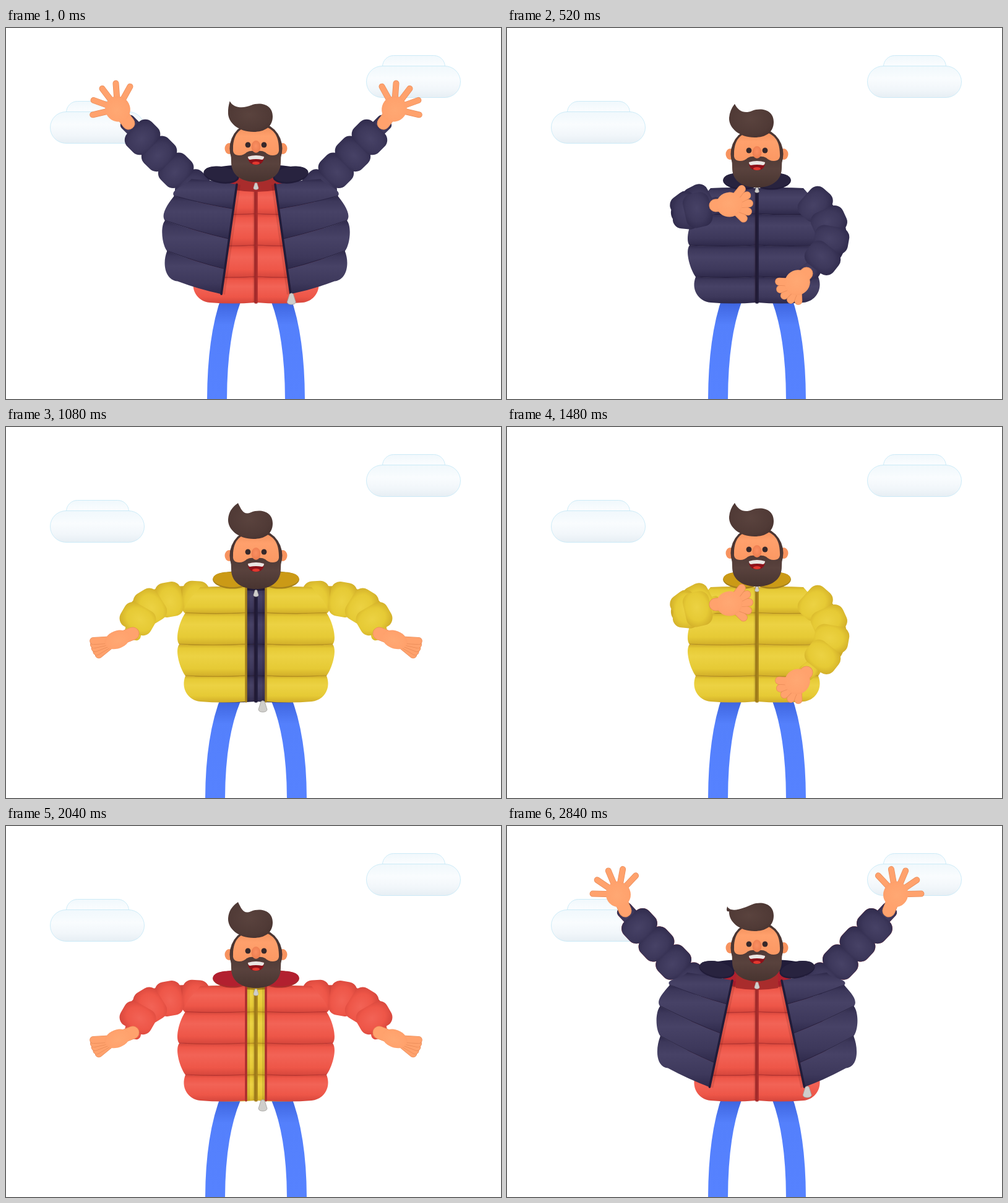
Recreate the animation shown at these times as an HTML page. Size 800 by 600 pixels, loop 2.88 s.

```html
<!DOCTYPE html>
<html lang="en">
<head>
<meta charset="utf-8">
<title>Jackets</title>
<style>
html, body { margin: 0; width: 100%; height: 100%; overflow: hidden; background: #fff; }
svg { display: block; width: 100vw; height: 100vh; }
</style>
</head>
<body>
<svg viewBox="0 0 800 600">
  <defs id="defs"></defs>
  <g id="clouds"></g>
  <g id="scene"></g>
</svg>
<script>
const LOOP = 960, STEP = 40, SWAP = 540, OPEN = 740, AXIS = 808;
const $ = id => document.getElementById(id);
const { sin, cos, max, min, PI, hypot, atan2 } = Math;
const RAD = PI / 180;
const mix = (a, b, k) => a + (b - a) * k;
const clamp = x => max(0, min(1, x));

const tones = [
  { id: 'navy', light: '#474266', mid: '#3d385b', dark: '#2e294a', seam: '#211c39', collar: '#28233f' },
  { id: 'yellow', light: '#ecd243', mid: '#e6ca35', dark: '#d0ac28', seam: '#a5801b', collar: '#cb9a16' },
  { id: 'red', light: '#f26356', mid: '#ee5648', dark: '#d4453b', seam: '#a92c2c', collar: '#b2202f' }
];

// Body: time, jacket gap, jacket tilt, eye line, lean of the quiff.
const bodyKeys = [
  [0, 30, 8, 189, 0.3], [120, 15, 0, 202, 1], [250, 14, -4.3, 197, 0.5], [480, 0, 0, 198, 0.63],
  [SWAP, 0, 0, 198, 0.63], [OPEN, 39, 12, 190, 0.8], [920, 39, 12, 191, 0]
];

// Arm: elbow, wrist, aim of the fingers, angle between them. Drawn for the left, mirrored for the right.
const lifted = [253, 209, 198, 154, -25, -33, 33];
const raised = [247, 197, 191, 137, -16, -38, 33];
const skyward = [272, 165, 264, 82, 0, -41, 30];
const sideways = [215, 268, 205, 334, -36, 14, 9];
const zipLow = [225, 390, 346, 428, 29, 8, -24];
const zipHigh = [251, 311, 337, 287, 32, -2, -24];
const holdHem = [245, 335, 324, 397, 21, 21, -24];
const armKeys = (from, to) => [[0, ...lifted], [120, ...sideways], [250, ...from], [480, ...to],
  [550, ...to], [OPEN, ...skyward], [820, ...skyward], [920, ...raised]];
const arms = [armKeys(zipLow, zipHigh), armKeys(holdHem, holdHem)];

// Cyclic monotone cubic interpolation.
function at(keys, t) {
  const n = keys.length;
  const key = i => keys[(i + n) % n];
  const time = i => key(i)[0] + LOOP * Math.floor(i / n);
  let i = n - 1;
  while (key(i)[0] > t) i--;
  const h = time(i + 1) - time(i), u = (t - time(i)) / h;
  return key(i).slice(1).map((a, j) => {
    const slope = m => (key(m + 1)[j + 1] - key(m)[j + 1]) / (time(m + 1) - time(m));
    const tangent = m => {
      const p = slope(m - 1), q = slope(m);
      return p * q > 0 ? 2 * p * q / (p + q) : 0;
    };
    const b = key(i + 1)[j + 1], v = u * u, w = v * u;
    return a + (b - a) * (3 * v - 2 * w) + h * (tangent(i) * (w - 2 * v + u) + tangent(i + 1) * (w - v));
  });
}

function bodyAt(t) {
  const [gap, tilt, eye, lean] = at(bodyKeys, t);
  return { gap, tilt, eye, lean };
}

function armAt(keys, t) {
  const [ex, ey, wx, wy, ax, ay, fan] = at(keys, t);
  const tilt = max(0, bodyAt(t).tilt);
  return { sx: 318 - 1.2 * tilt, sy: 278 - 1.8 * tilt, ex, ey, wx, wy, ax, ay, fan };
}

const path = (d, attrs) => `<path d="${d}" ${attrs}/>`;
const oval = (x, y, rx, ry, attrs) => `<ellipse cx="${x}" cy="${y}" rx="${rx}" ry="${ry}" ${attrs}/>`;
const group = (transform, s) => `<g transform="${transform}">${s}</g>`;
const flip = s => group(`matrix(-1 0 0 1 ${AXIS} 0)`, s);
const both = s => s + flip(s);

// Front edge of a jacket half, from neck to hem.
function frontEdge({ gap, tilt }) {
  const x = 403 - gap, y = 259 - 0.75 * max(0, tilt), len = 185 - 0.75 * max(0, tilt);
  return [x, y, x - len * sin(tilt * RAD), y + len * cos(tilt * RAD)];
}

function panel(body, tone) {
  const [x0, y0, x1, y1] = frontEdge(body);
  const inner = i => {
    const k = i / 4 + 0.025 * sin(PI * (i - 2) / 2);
    return [mix(x0, x1, k), mix(y0, y1, k)];
  };
  const outer = i => {
    const [x, y] = inner(i), w = 74 + 34 * sin(PI * i / 4);
    const a = 2.2 * max(0, body.tilt) * sin(PI * (i + 1) / 8) * RAD;
    return [x - w * cos(a), y - w * sin(a)];
  };
  const edge = `M${x0} ${y0}L${x1} ${y1}`;
  let s = path(edge, 'stroke="#200" stroke-opacity=".1" stroke-width="12"');
  for (let i = 0; i < 4; i++) {
    const a = inner(i), b = inner(i + 1), o = outer(i), p = outer(i + 1), hem = i === 3;
    const crease = (q, r, sag) => `Q${(q[0] + r[0]) / 2} ${(q[1] + r[1]) / 2 + sag} ${r}`;
    const side = hem
      ? `C${p[0] - 20} ${p[1] - 2} ${o[0] - 8} ${o[1] + 20} ${o}`
      : `C${p[0] - 8} ${p[1] - 10} ${o[0] - 8} ${o[1] + 10} ${o}`;
    s += path(`M${a}L${b}${crease(b, p, 3)}${side}${crease(o, a, i ? 3 : -2)}Z`, `fill="url(#row-${tone.id})"`);
    if (!hem) s += path(`M${b}${crease(b, p, 3)}`, `fill="none" stroke="${tone.seam}" stroke-width="2" stroke-opacity=".7"`);
  }
  return s + path(edge, `stroke="${tone.seam}" stroke-width="3.5" stroke-linecap="round"`);
}

function sleeve({ sx, sy, ex, ey, wx, wy }, tone) {
  const puff = (t, len, wide, r) => {
    const u = 1 - t;
    const x = u * u * sx + 2 * u * t * ex + t * t * wx, y = u * u * sy + 2 * u * t * ey + t * t * wy;
    const turn = atan2(mix(ey - sy, wy - ey, t), mix(ex - sx, wx - ex, t)) / RAD;
    return group(`translate(${x} ${y}) rotate(${turn})`,
      `<rect x="${-len / 2}" y="${-wide / 2}" width="${len}" height="${wide}" rx="${r}" fill="url(#puff-${tone.id})"/>`);
  };
  let s = puff(0.97, 28, 27, 7) +
    path(`M${sx} ${sy}Q${ex} ${ey} ${mix(ex, wx, 0.75)} ${mix(ey, wy, 0.75)}`,
      `fill="none" stroke="${tone.dark}" stroke-width="38"`);
  for (let i = 0; i < 4; i++) s += puff(0.06 + 0.245 * i, 43, 56, 15);
  return s;
}

function hand({ wx, wy, ax, ay, fan }) {
  const px = 0.7 * ax, py = 0.7 * ay, aim = atan2(ay, ax), reach = max(28, hypot(ax, ay));
  const limb = (x, y, w) => ['#e88a57', '#ffa26d'].map((c, i) =>
    path(`M${px} ${py}L${x} ${y}`, `stroke="${c}" stroke-width="${w - 1.4 * i}" stroke-linecap="round"`)).join('');
  let s = limb(0, 0, 21);
  for (let i = 4; i >= 0; i--) {
    const a = aim + fan * (2 - i) * RAD;
    s += limb(px + reach * cos(a), py + reach * sin(a), 13 - 3 * clamp(fan / 33));
  }
  s += group(`translate(${px} ${py}) rotate(${aim / RAD})`,
    oval(0, 0, 21, 11 + 9 * clamp(Math.abs(fan) / 24), 'fill="url(#skin)"'));
  return group(`translate(${wx} ${wy})`, s);
}

function collar({ gap, tilt }) {
  const x = 349 - gap, lean = max(0, tilt), y = 248 - 1.3 * lean;
  return {
    back: tone => oval(404, y - 5, 398 - x, 12, `fill="${tone.seam}"`),
    flaps: tone => both(group(`translate(${x + 29} ${y}) rotate(${4 + lean * 0.6})`,
      oval(0, 0, 29, 13.5, `fill="${tone.seam}"`) + oval(-1, -1, 27.5, 12, `fill="${tone.collar}"`)))
  };
}

const tab = (x, y, size) => group(`translate(${x} ${y}) scale(${size})`,
  path('M-3-8Q0-11 3-8L7 5Q6 9 0 9Q-6 9-7 5Z', 'fill="#cfcecb" stroke="#9f9d9b" stroke-width=".8"'));

function head({ eye, lean }) {
  const tx = -48 + 19 * lean, ty = -61 - 18 * Math.sqrt(lean);
  const eyes = [-13, 13].map(x => oval(x, 0, 4.4, 4.6, 'fill="#37282a"')).join('');
  const ears = [-43.5, 43.5].map(x => oval(x, 6, 7, 9, 'fill="#f7935f"')).join('');
  return group(`translate(404 ${eye})`,
    ears +
    oval(0, 6, 42.5, 43, 'fill="#4b3633"') +
    path('M-41 0L-40 28C-40 50-22 60 0 60C22 60 40 50 40 28L41 0Z', 'fill="url(#beard)"') +
    path('M-37 6C-37-20-24-31 0-31C24-31 37-20 37 6Q38 17 27 17Q20 17 15 12Q8 8 0 11Q-8 8-15 12Q-20 17-27 17Q-38 17-37 6Z',
      'fill="url(#face)"') +
    path('M-13 19Q0 15 13 19Q13 32 0 32Q-13 32-13 19Z', 'fill="#8d1119"') +
    oval(0, 29.5, 6, 2.5, 'fill="#e2382f"') +
    path('M-13 19Q0 15 13 19Q13 23 10 24Q0 22-10 24Q-13 23-13 19Z', 'fill="#e9e6e3"') +
    eyes +
    oval(0, 3, 7.5, 10, 'fill="url(#nose)"') +
    path(`M${tx} ${ty}C${tx + 6} ${ty + 12} -20 -59 -8 -64C8 -70 27 -65 27 -46C27 -29 14 -21 -4 -21` +
      `C-28 -21 -46 -36 -45 -53Q${min(-44, tx - 3)} ${ty + 10} ${tx} ${ty}Z`, 'fill="url(#quiff)"'));
}

function legs(eye) {
  const foot = 341 - 0.75 * max(0, eye - 198);
  return both(path(`M364 438Q${foot} 500 ${foot} 604`, 'fill="none" stroke="url(#denim)" stroke-width="32"'));
}

function figure(time) {
  const turn = Math.floor(time / LOOP), t = time % LOOP;
  const falling = t > SWAP, late = falling ? max(t, OPEN) : t;
  const outer = tones[(turn + falling) % 3], inner = tones[(turn + falling + 2) % 3];
  const drop = falling ? -430 * (1 - clamp((t - 530) / 350) ** 2) : 0;
  const landed = drop > -20;
  const moved = s => group(`translate(0 ${drop})`, s);

  const body = bodyAt(t), coat = bodyAt(late), shut = bodyAt(SWAP);
  const neck = collar(coat), innerNeck = collar(shut);
  const limbs = arms.map(k => armAt(k, t)), worn = arms.map(k => armAt(k, late));
  const hands = hand(limbs[0]) + flip(hand(limbs[1]));
  const outward = a => a.wx < 285;
  const sleeves = (list, tone, wanted) => {
    const [l, r] = list.map(a => wanted(a) ? sleeve(a, tone) : '');
    return l + flip(r);
  };
  const jacket = (b, list, tone) => sleeves(list, tone, outward) + both(panel(b, tone)) +
    sleeves(list, tone, a => !outward(a));

  const [x0, y0, x1, y1] = frontEdge(coat);
  const zip = clamp((t - 250) / 230);
  const tag = falling || !zip
    ? tab(AXIS - x1 - 5 + 0.8 * max(0, coat.tilt), y1 + 8, 1)
    : tab(404, mix(450, 262, zip), mix(1, 0.5, zip));

  let s = moved(path(`M${x0} ${y0}L${x1} ${y1}H${AXIS - x1}L${AXIS - x0} ${y0}Z`, `fill="${outer.seam}"`) + neck.back(outer));
  s += legs(body.eye);
  if (t < 480 || falling) {
    s += innerNeck.back(inner) + (falling ? jacket(shut, limbs, inner) : both(panel(shut, inner))) +
      innerNeck.flaps(inner) +
      path(`M370 ${body.eye + 50}H438V262Q404 268 370 262Z`, `fill="${inner.seam}"`) +
      tab(404, body.eye + 67, 0.6);
  }
  if (!landed) s += hands;
  s += moved(jacket(coat, worn, outer) + tag + neck.flaps(outer));
  return s + head(body) + (landed ? hands : '');
}

const stops = list => list.map(([o, c]) => `<stop offset="${o}" stop-color="${c}"/>`).join('');
const linear = (id, list, extra = 'x2="0" y2="1"') => `<linearGradient id="${id}" ${extra}>${stops(list)}</linearGradient>`;
const radial = (id, list) => `<radialGradient id="${id}" cx=".48" cy=".44" r=".66">${stops(list)}</radialGradient>`;

$('defs').innerHTML = tones.map(c =>
  linear('row-' + c.id, [[0, c.dark], [0.12, c.mid], [0.36, c.light], [0.75, c.mid], [1, c.dark]]) +
  radial('puff-' + c.id, [[0, c.light], [0.6, c.mid], [1, c.dark]])).join('') +
  radial('skin', [[0, '#ffa873'], [0.7, '#ffa26d'], [1, '#fa9a66']]) +
  linear('face', [[0, '#f08e5a'], [0.35, '#ffa06c'], [1, '#fb9863']]) +
  radial('nose', [[0, '#fb8f62'], [1, '#e97a4c']]) +
  linear('beard', [[0, '#4b3633'], [0.5, '#59423d'], [1, '#483430']]) +
  radial('quiff', [[0, '#5a433e'], [0.7, '#503a36'], [1, '#45312e']]) +
  linear('denim', [[0, '#3c62dc'], [0.25, '#5480fc'], [1, '#5682ff']],
    'gradientUnits="userSpaceOnUse" x1="0" y1="440" x2="0" y2="600"') +
  linear('cloud', [[0, '#f0f8fc'], [0.4, '#f9fcfe'], [0.75, '#f1f6fa'], [1, '#e6eef4']]);

const pill = (x, y, w, h) =>
  `<rect x="${x}" y="${y}" width="${w}" height="${h}" rx="${min(25.5, h / 2)}" fill="url(#cloud)" stroke="#c3e7f7" stroke-width=".8"/>`;
const cloud = (x, y) => group(`translate(${x} ${y})`, pill(26, 0, 101, 36) + pill(0, 17, 152, 51));
$('clouds').innerHTML = cloud(71.5, 118.5) + cloud(582.5, 44.5);

let start;
function tick(now) {
  start ??= now;
  const time = (now - start) % (LOOP * 3);
  $('scene').innerHTML = figure(Math.floor(time / STEP) * STEP);
  requestAnimationFrame(tick);
}
$('scene').innerHTML = figure(0);
requestAnimationFrame(tick);
</script>
</body>
</html>
```
